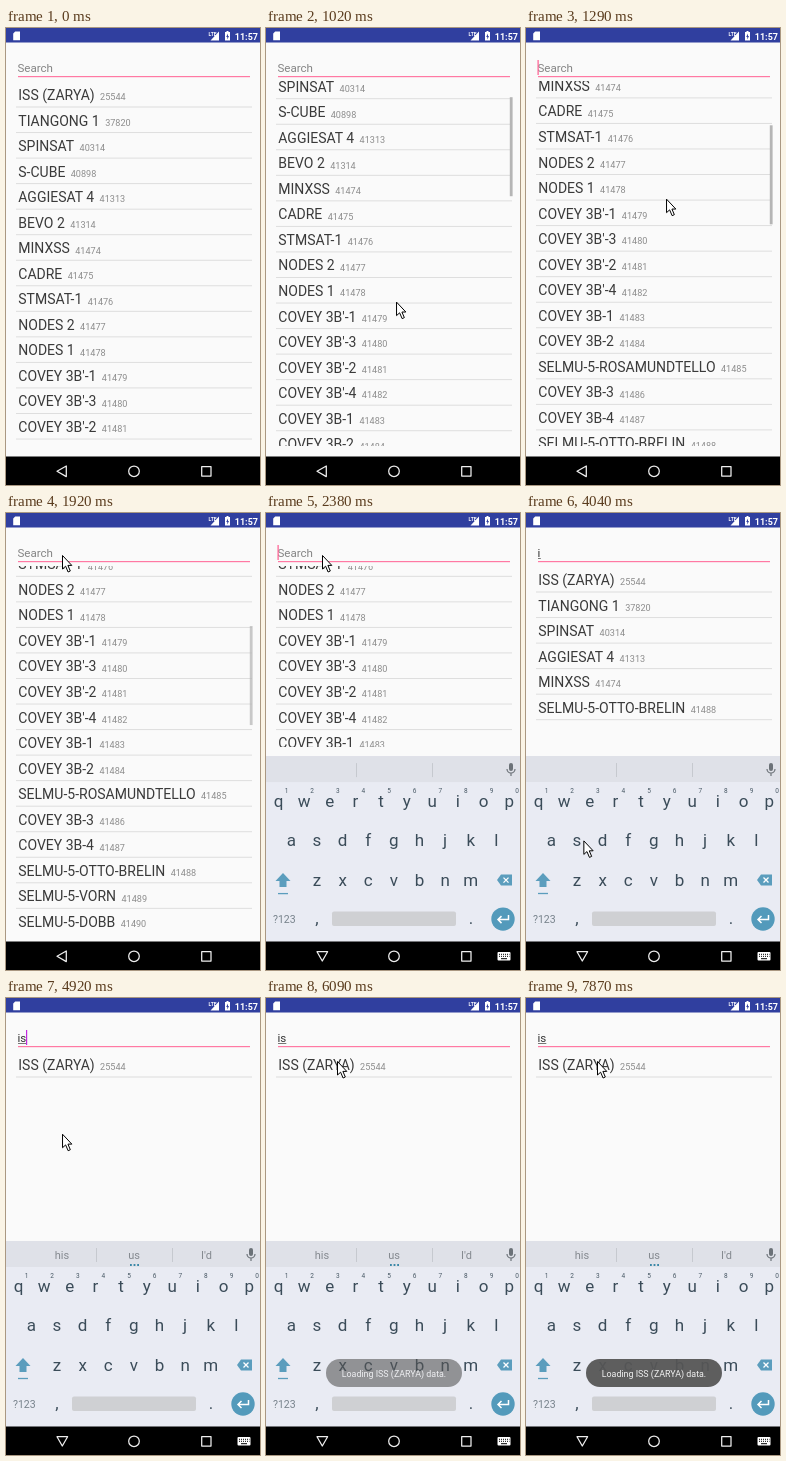
Animation, 254 px wide and 457 px high, one loop 8 s. Source, as an HTML page:

```html
<!DOCTYPE html>
<html lang="en">
<head>
<meta charset="utf-8">
<title>Satellite search</title>
<style>
  html, body { margin: 0; width: 100%; height: 100%; overflow: hidden; background: #fafafa; }
  svg { display: block; width: 100%; height: 100%; font-family: Roboto, sans-serif; }
  .name { font-size: 14px; fill: #3a3a3a; }
  .id { font-size: 9.1px; fill: #8c8c8c; }
  .key { font-size: 17px; fill: #3b4c59; text-anchor: middle; }
  .digit { font-size: 6.5px; fill: #4a5a66; text-anchor: middle; }
  .word { font-size: 11px; fill: #858a90; text-anchor: middle; }
  .nav { fill: none; stroke: #eee; stroke-width: 1.25; stroke-linejoin: round; }
</style>
</head>
<body>
<svg viewBox="0 0 254 457">
  <defs>
    <clipPath id="listClip"><rect id="listArea" y="53" width="254" height="365"/></clipPath>
  </defs>
  <rect width="254" height="457" fill="#fafafa"/>

  <g clip-path="url(#listClip)">
    <g id="list"></g>
    <rect id="scrollbar" x="243.8" width="2.8" height="99" fill="#b5b5b5"/>
  </g>

  <text id="field" x="11.4" y="44" font-size="11.6"></text>
  <rect id="composing" x="12" y="45.2" width="8.3" height=".8" fill="#555"/>
  <rect x="12" y="48" width="232" height="1.2" fill="#ff79a3"/>
  <rect id="caret" y="32" width="1.2" height="15"/>

  <rect width="254" height="14.5" fill="#303f9f"/>
  <path d="M9.200 3.500H14V12.300H7.200V5.500Z" fill="#fff"/>
  <path d="M213 3.5V12.5H204.500Z" fill="#fff"/>
  <text x="202.500" y="8" font-size="5" font-weight="700" fill="#fff">LTE</text>
  <path d="M220.500 3H222.500V4H224V12.500H219V4H220.500Z" fill="#fff"/>
  <path d="M222 5.500L220.200 9H221.300V11.500L223 8H222Z" fill="#303f9f"/>
  <text x="228.800" y="11.500" font-size="9" font-weight="700" fill="#fff">11:57</text>

  <g id="keyboard">
    <rect y="243" width="254" height="186" fill="#e9ebf3"/>
    <rect y="243" width="254" height="26" fill="#dfe1e8"/>
    <path d="M90.500 250V264M166.500 250V264" stroke="#c6c9cf"/>
    <g id="suggestions">
      <text class="word" x="56" y="261">his</text>
      <text class="word" x="128" y="261">us</text>
      <text class="word" x="200.5" y="261">I'd</text>
      <path d="M124 267H133" stroke="#3a88a8" stroke-width="1.8" stroke-dasharray="1.8"/>
    </g>
    <rect x="243" y="250" width="4" height="8" rx="2" fill="#6c7278"/>
    <path d="M241 256a4 4 0 0 0 8 0M245 260V263" fill="none" stroke="#6c7278" stroke-width="1.2"/>
    <g id="keys"></g>
    <path d="M17 360L24.500 368H20.500V374H13.500V368H9.500Z" fill="#5b9dbd"/>
    <path d="M12 380.500H22" stroke="#5b9dbd" stroke-width="1.3"/>
    <path d="M231 367L235 361.500H246V372.500H235Z" fill="#5b9dbd"/>
    <path d="M237.500 364.500L242.500 369.500M242.500 364.500L237.500 369.500" stroke="#fff" stroke-width="1.3"/>
    <text x="7" y="410" font-size="10.5" fill="#77828b">?123</text>
    <rect x="66" y="398.500" width="124" height="14.500" rx="2" fill="#cfd0d3"/>
    <circle cx="237" cy="406" r="11.700" fill="#539abb"/>
    <path d="M242.500 402V406.500H232M235.500 403L232 406.500L235.500 410" fill="none" stroke="#fff" stroke-width="1.5"/>
  </g>

  <g id="popup">
    <rect x="-15.500" y="-59" width="31" height="71.500" rx="1.500" fill="#999" opacity=".5"/>
    <rect x="-15.500" y="-59.500" width="31" height="71" rx="1.500" fill="#cecece"/>
    <text id="popupLetter" y="-34" font-size="22" fill="#235b72" text-anchor="middle"></text>
    <path d="M6 -26H15" stroke="#8fa9c4" stroke-width="1.500" stroke-dasharray="1.500"/>
  </g>

  <rect y="428.500" width="254" height="29" fill="#000"/>
  <path id="back" class="nav" d="M51 443.300L60.300 438V448.600Z"/>
  <circle class="nav" cx="128" cy="443.300" r="5.300"/>
  <rect class="nav" x="195.700" y="438.700" width="9.300" height="9.300"/>
  <g id="imeIcon">
    <rect x="231.500" y="439" width="13" height="8.500" rx="1" fill="#fff"/>
    <path d="M233 441.300H243.500M233 443.300H243.500" stroke="#000" stroke-dasharray="1"/>
    <path d="M235 445.700H241" stroke="#000"/>
  </g>

  <g id="toast">
    <rect x="60" y="361" width="136" height="28" rx="14" fill="#555" opacity=".94"/>
    <text x="128" y="378.500" font-size="8.900" fill="#f2f2f2" text-anchor="middle">Loading ISS (ZARYA) data.</text>
  </g>

  <path id="pointer" d="M.5 .5V14L3.600 11.200L6.100 17L8.300 16L5.900 10.400H9.800Z"
        fill="#fff" stroke="#000" stroke-linejoin="round"/>
</svg>

<script>
const LOOP = 8000, ROW = 25.54;
const el = id => document.getElementById(id);
const clamp = (v, lo = 0, hi = 1) => Math.min(hi, Math.max(lo, v));
const ramp = (t, from, to) => clamp((t - from) / (to - from));
const within = (t, from, to) => t >= from && t < to;
const show = (id, visible) => el(id).setAttribute('visibility', visible ? 'visible' : 'hidden');

const names = ['ISS (ZARYA)', 'TIANGONG 1', 'SPINSAT', 'S-CUBE', 'AGGIESAT 4', 'BEVO 2', 'MINXSS',
  'CADRE', 'STMSAT-1', 'NODES 2', 'NODES 1', "COVEY 3B'-1", "COVEY 3B'-3", "COVEY 3B'-2",
  "COVEY 3B'-4", 'COVEY 3B-1', 'COVEY 3B-2', 'SELMU-5-ROSAMUNDTELLO', 'COVEY 3B-3',
  'COVEY 3B-4', 'SELMU-5-OTTO-BRELIN', 'SELMU-5-VORN', 'SELMU-5-DOBB'];
const firstIds = [25544, 37820, 40314, 40898, 41313, 41314];
const satellites = names.map((name, i) => ({ name, id: firstIds[i] ?? 41468 + i }));

// Pointer path: time, x, y
const path = [
  [320, 256, 395], [600, 125, 340], [800, 125, 340], [900, 126, 320], [1020, 130, 274],
  [1290, 140, 171], [1420, 145, 127], [1570, 146, 113], [1680, 146, 113], [1900, 56, 42],
  [2460, 56, 42], [2740, 150, 324], [2910, 171, 289], [3100, 171, 289], [3180, 193, 287],
  [3560, 193, 287], [4060, 52, 329], [4760, 52, 329], [4920, 56, 136], [5080, 62, 92],
  [5480, 71, 63]
];
const caretOn = [[130, 600], [1130, 1640], [2140, 2640], [3100, 3920],
  [4370, 4960], [5430, 5920], [6420, 6880], [7410, 7870]];
const taps = [
  { letter: 'i', x: 192.5, y: 289, from: 3330, to: 3450 },
  { letter: 's', x: 51, y: 328, from: 4260, to: 4370 }
];

function pointerAt(t) {
  const next = path.findIndex(p => p[0] > t);
  if (next < 0) return path.at(-1).slice(1);
  const [t0, x0, y0] = path[Math.max(0, next - 1)], [t1, x1, y1] = path[next];
  const k = ramp(t, t0, t1);
  return [x0 + (x1 - x0) * k, y0 + (y1 - y0) * k];
}

function buildKeys() {
  const key = (c, x, y) => `<text class="key" x="${x}" y="${y}">${c}</text>`;
  const row = (letters, x, y) => [...letters].map((c, i) => key(c, x + i * 25.63, y)).join('');
  const digits = [...'1234567890']
    .map((c, i) => `<text class="digit" x="${20.5 + i * 25.63}" y="279.500">${c}</text>`).join('');
  el('keys').innerHTML = digits + row('qwertyuiop', 12.5, 294) + row('asdfghjkl', 25.3, 333)
    + row('zxcvbnm', 51, 372.5) + key(',', 51, 411) + key('.', 205, 411);
}

let listedQuery = null;
function fillList(query) {
  if (query === listedQuery) return;
  listedQuery = query;
  el('list').innerHTML = satellites
    .filter(s => s.name.toLowerCase().includes(query))
    .map((s, i) => `<g transform="translate(0 ${i * ROW})">
      <text class="name" x="12.300" y="72">${s.name}<tspan class="id" dx="5.400" dy=".3">${s.id}</tspan></text>
      <rect x="10" y="78.500" width="236" height="1" fill="#dedede"/></g>`)
    .join('');
}

function render(t) {
  const [px, py] = pointerAt(t);
  el('pointer').setAttribute('transform', `translate(${px} ${py})`);
  show('pointer', t >= 320);

  const query = taps.filter(tap => t >= tap.to).map(tap => tap.letter).join('');
  fillList(query);
  const dragged = t < 800 ? 0 : clamp(333 - pointerAt(Math.min(t, 1570))[1], 0, 220);
  el('list').setAttribute('transform', `translate(0 ${query ? 0 : -dragged})`);
  el('scrollbar').setAttribute('y', 53 + dragged * 0.273);
  el('scrollbar').setAttribute('opacity', t < 800 ? 0 : 1 - ramp(t, 1850, 2100));

  el('field').textContent = query || 'Search';
  el('field').setAttribute('fill', query ? '#333' : '#858585');
  show('composing', query);
  el('composing').setAttribute('width', query.length > 1 ? 8.3 : 2.8);
  show('caret', caretOn.some(([from, to]) => within(t, from, to)));
  el('caret').setAttribute('x', [11.5, 14, 20][query.length]);
  el('caret').setAttribute('fill', query ? '#c22be0' : '#ff5c90');

  const rise = 1 - (1 - ramp(t, 2130, 2400)) ** 2;
  const typing = t >= 2130;
  el('keyboard').setAttribute('opacity', rise);
  el('keyboard').setAttribute('transform', `translate(0 ${20 * (1 - rise)})`);
  el('listArea').setAttribute('height', t >= 2200 ? 181 : 365);
  el('back').setAttribute('transform', typing ? 'rotate(-90 56 443)' : '');
  show('imeIcon', typing);
  show('suggestions', query === 'is');

  const tap = taps.find(p => within(t, p.from, p.to));
  show('popup', tap);
  if (tap) {
    el('popup').setAttribute('transform', `translate(${tap.x} ${tap.y})`);
    el('popupLetter').textContent = tap.letter;
  }
  el('toast').setAttribute('opacity', ramp(t, 5820, 6250));
}

buildKeys();
const start = performance.now();
function frame() {
  render((performance.now() - start) % LOOP);
  requestAnimationFrame(frame);
}
frame();
</script>
</body>
</html>
```
